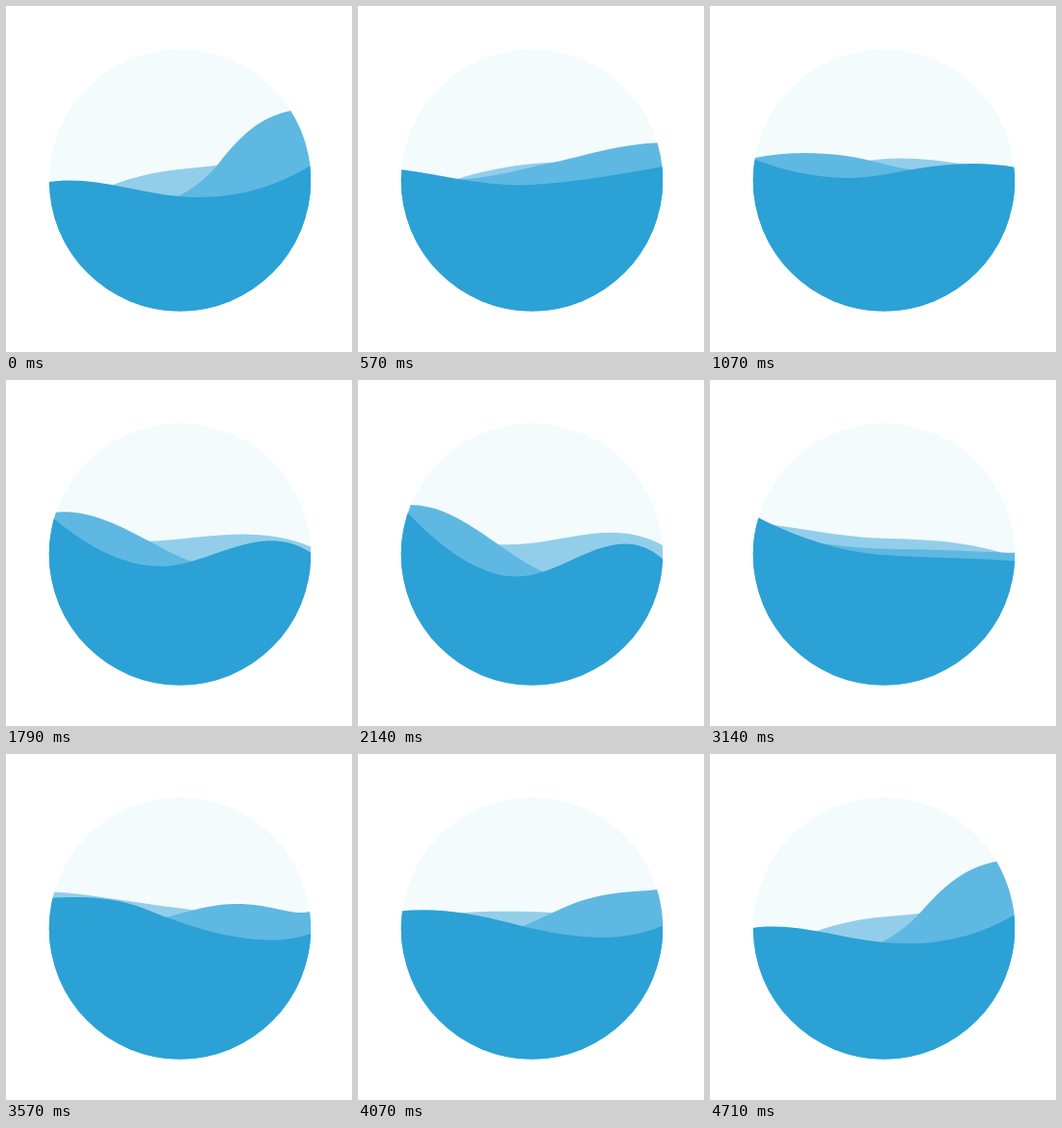
These frames come from a looping animation (360x360 px, 4780 ms). An HTML page:

```html
<!DOCTYPE html>
<html lang="en">
<head>
<meta charset="utf-8">
<title>Water waves</title>
<style>
  html, body { margin: 0; width: 100%; height: 100%; overflow: hidden; background: #fff; }
  svg { display: block; width: 100vw; height: 100vh; }

  path { animation: 4780ms linear infinite; }
  .back { fill: #92ceea; animation-name: back; }
  .middle { fill: #5eb8e2; animation-name: middle; }
  .front { fill: #2ba1d6; animation-name: front; }

  /* Each surface is two joined curves that morph through four poses. */
  @keyframes back {
    0%, 100% { d: path("M44 218C89 192 135 174 180 170S271 158 317 158V322H44Z"); }
    25% { d: path("M44 182C89 173 135 162 180 158S271 167 317 176V322H44Z"); }
    50% { d: path("M44 157C89 165 135 178 180 173S271 141 317 171V322H44Z"); }
    75% { d: path("M44 143C89 145 135 155 180 160S271 183 317 192V322H44Z"); }
  }
  @keyframes middle {
    0%, 100% { d: path("M44 205C150 230 199 192 222 163S270 107 317 107V322H44Z"); }
    25% { d: path("M44 153C83 140 127 147 175 164S271 183 317 180V322H44Z"); }
    50% { d: path("M44 125C97 118 142 177 185 203S271 194 317 208V322H44Z"); }
    75% { d: path("M44 176C97 198 142 175 203 160S295 171 317 163V322H44Z"); }
  }
  @keyframes front {
    0%, 100% { d: path("M44 183C89 176 135 194 180 198S271 194 317 166V322H44Z"); }
    25% { d: path("M44 156C89 176 135 183 180 173S271 155 317 168V322H44Z"); }
    50% { d: path("M44 123C89 180 135 219 180 211S271 144 317 191V322H44Z"); }
    75% { d: path("M44 150C78 148 111 147 145 161S260 208 317 187V322H44Z"); }
  }
</style>
</head>
<body>
<svg viewBox="0 0 360 360">
  <clipPath id="bowl"><circle cx="181" cy="181.3" r="136.2"/></clipPath>
  <g clip-path="url(#bowl)">
    <rect width="360" height="360" fill="#f3fbfd"/>
    <path class="back"/>
    <path class="middle"/>
    <path class="front"/>
  </g>
</svg>
</body>
</html>
```
